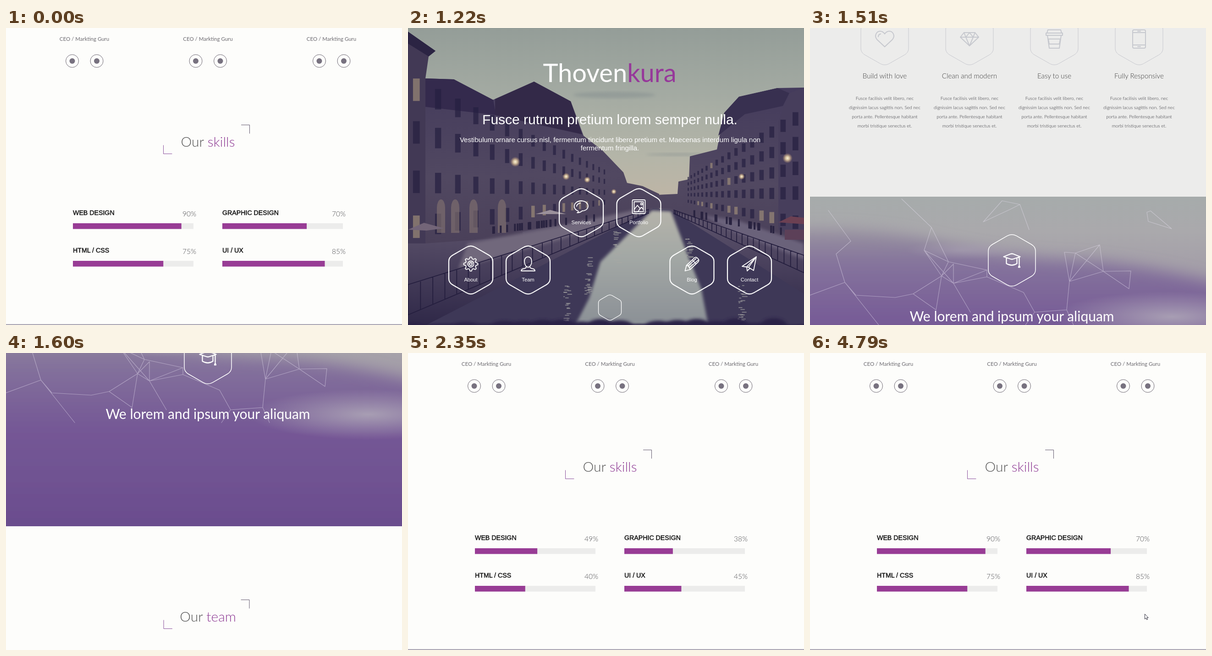
Animation of 864 by 648 pixels, one loop 4910 ms. Source, as an HTML page:

```html
<!DOCTYPE html>
<html lang="en">
<head>
<meta charset="utf-8">
<title>Template tour</title>
<style>
  html, body { margin: 0; width: 100%; height: 100%; overflow: hidden; background: #fdfdfb; }
  svg { display: block; width: 864px; height: 648px; }
  text { font-family: Lato, sans-serif; text-anchor: middle; }
  .arial { font-family: "Liberation Sans", Arial, sans-serif; }
  .line { fill: none; stroke-linejoin: round; stroke-linecap: round; }
</style>
</head>
<body>
<svg id="stage" viewBox="0 0 864 648"></svg>
<script>
const LOOP = 4910, FRAME = 1000 / 24;
const CUT = 1220, SCROLL_START = 1231, SCROLL_TIME = 638, SCROLL_END = 2433;
const FEATURES_Y = 988;

const skills = [
  { name: 'WEB DESIGN', value: 90, x: 146, y: 426, start: 1797 },
  { name: 'GRAPHIC DESIGN', value: 70, x: 472, y: 426, start: 1797 },
  { name: 'HTML / CSS', value: 75, x: 146, y: 508, start: 1809 },
  { name: 'UI / UX', value: 85, x: 472, y: 508, start: 1809 }
];

// Line icons, each centred on 0,0
const icons = {
  heart: 'M0 17L-17 1C-24 -8 -17 -17 -10 -17C-5 -17 -2 -14 0 -11C2 -14 5 -17 10 -17C17 -17 24 -8 17 1ZM-14 -5Q-14 -10 -9 -11',
  diamond: 'M-12 -14H12L20 -4L0 15L-20 -4ZM-20 -4H20M-12 -14L-8 -4L0 15L8 -4L12 -14M-8 -4L0 -14L8 -4',
  cup: 'M-14 -20H14L16 -13H-16ZM-18 -13H18V-8H-18ZM-15 -8L-11 20H11L15 -8M-13 0H13L11 11H-11Z',
  phone: 'M-11 -20H11Q14 -20 14 -17V17Q14 20 11 20H-11Q-14 20 -14 17V-17Q-14 -20 -11 -20ZM-14 -14H14M-14 13H14M-3 16.5H3M-3 -17H3',
  cap: 'M-18 -8L-3 -14Q0 -15 3 -14L18 -8L3 -3Q0 -2 -3 -3ZM-12 -5V7Q0 14 11 7V-5M16 -7V9M16 11L14.5 15H17.5Z',
  bubble: 'M-7 9C-20 5 -18 -12 0 -13C19 -12 20 8 2 9Q-2 13 -9 13Q-5 12 -7 9ZM-10 -1Q-9 -7 -2 -8',
  picture: 'M-12 -15H12Q14 -15 14 -13V13Q14 15 12 15H-12Q-14 15 -14 13V-13Q-14 -15 -12 -15ZM-10 -11H10V11H-10ZM-10 6L-3 -3L3 4L6 1L10 6M-2 11L3 4M4 -6a2 2 0 1 0 4 0a2 2 0 1 0 -4 0',
  person: 'M-8 -6C-8 -19 8 -19 8 -6C8 1 4 7 0 7C-4 7 -8 1 -8 -6ZM-4 6Q-4 9 -9 10Q-15 11 -15 15H15Q15 11 9 10Q4 9 4 6',
  pencil: 'M-15 15L-12 3L5 -13Q9 -17 13 -12Q17 -8 13 -4L-4 12ZM-12 3Q-6 3 -4 12M-8 4L9 -12M-6 8L13 -8M1 -9L9 0',
  plane: 'M-16 5L15 -16L9 14L-2 7ZM-16 5L-2 7L15 -16L-6 6L-5 15L1 9'
};
const gear = () => {
  let path = '';
  for (let i = 0; i < 32; i++) {
    const radius = i % 4 < 2 ? 15.5 : 11.5, angle = (i - .5) * Math.PI / 16;
    path += `${i ? 'L' : 'M'}${radius * Math.cos(angle)} ${radius * Math.sin(angle)}`;
  }
  return path + 'ZM-6.5 0a6.5 6.5 0 1 0 13 0a6.5 6.5 0 1 0 -13 0M-3 0a3 3 0 1 0 6 0a3 3 0 1 0 -6 0';
};
icons.gear = gear();

const text = (x, y, size, content, attrs = '') =>
  `<text x="${x}" y="${y}" font-size="${size}" ${attrs}>${content}</text>`;
const rect = (x, y, w, h, fill, attrs = '') =>
  `<rect x="${x}" y="${y}" width="${w}" height="${h}" fill="${fill}" ${attrs}/>`;
const ellipse = (x, y, rx, ry, fill, attrs = '') =>
  `<ellipse cx="${x}" cy="${y}" rx="${rx}" ry="${ry}" fill="${fill}" ${attrs}/>`;
const shape = (points, fill, attrs = '') => `<polygon points="${points}" fill="${fill}" ${attrs}/>`;
const line = (d, stroke, width, attrs = '') =>
  `<path class="line" d="${d}" stroke="${stroke}" stroke-width="${width}" ${attrs}/>`;
const group = (x, y, content) => `<g transform="translate(${x} ${y})">${content}</g>`;
const gradient = (id, ...stops) => `<linearGradient id="${id}" x2="0" y2="1">` +
  stops.map(([at, color, alpha = 1]) => `<stop offset="${at}" stop-color="${color}" stop-opacity="${alpha}"/>`).join('') +
  '</linearGradient>';
const blur = (id, amount) => `<filter id="${id}" x="-20%" y="-20%" width="140%" height="140%"><feGaussianBlur stdDeviation="${amount}"/></filter>`;

function hexagon(w, h, stroke, width, attrs) {
  const side = s => `Q${s * w} ${s * h * .52} ${s * w * .82} ${s * h * .614}L${s * w * .2} ${s * h * .936}` +
    `Q0 ${s * h * 1.04} ${-s * w * .2} ${s * h * .936}L${-s * w * .82} ${s * h * .614}Q${-s * w} ${s * h * .52} ${-s * w} ${s * h * .36}`;
  return line(`M${-w} ${-h * .36}${side(-1)}L${w} ${h * .36}${side(1)}Z`, stroke, width, attrs);
}

function heading(y, word, half) {
  const left = 440.5 - half - 38.5, right = 440.5 + half + 32.5;
  return group(0, y,
    text(440.5, 259, 30, `Our <tspan fill="#8e3a94">${word}</tspan>`, 'font-weight="300" fill="#555"') +
    line(`M${right - 18} 211.5H${right}V230`, '#62586e', 1) +
    line(`M${left} 256V274.5H${left + 18.5}`, '#8a4f9c', 1));
}

let seed = 7;
const random = () => (seed = seed * 16807 % 2147483647) / 2147483647;

// Windows on a facade that recedes to the vanishing point 545,365
function facade(reach, floors, w, h) {
  let out = '';
  for (let s = .98; s > .2; s *= .91)
    floors.forEach((offset, i) => {
      const lit = random() < (i === floors.length - 1 ? .35 : .03);
      out += rect(545 + reach * s, 365 + offset * s, w * s, h * s, lit ? '#9c8a78' : '#262040', 'opacity=".7"');
    });
  return out;
}

function railing(x0, y0, x1, y1, height) {
  let d = `M${x0} ${y0}L${x1} ${y1}M${x0} ${y0 + height}L${x1} ${y1 + 8}`;
  for (let s = 0; s < 1; s += .035) {
    const u = 1 - (1 - s) ** 1.5;
    d += `M${x0 + (x1 - x0) * u} ${y0 + (y1 - y0) * u}v${height + (8 - height) * u}`;
  }
  return line(d, '#241e3e', 1.8);
}

function canalPhoto() {
  let out = rect(0, 0, 864, 400, 'url(#sky)') + rect(0, 400, 864, 248, 'url(#quay)') +
    ellipse(450, 146, 90, 7, '#7d878a', 'opacity=".4" filter="url(#soft)"') +
    ellipse(590, 276, 70, 3, '#7d878a', 'opacity=".4" filter="url(#soft)"') +
    shape('185,157 275,117 355,160 383,235 425,268 470,315 478,338 512,345 548,362 548,395 185,455', 'url(#wall)') +
    shape('38,110 100,112 186,157 250,230 250,455 38,470', 'url(#wall)') +
    shape('0,8 60,50 45,62 38,110 38,470 0,470', '#423955') +
    shape('0,8 60,50 45,62 0,34', '#2b2443') +
    shape('38,110 100,112 186,157 192,190 38,172', '#342a4d') +
    shape('190,155 275,117 355,160 380,232 190,190', '#332948') +
    shape('864,130 806,131 722,150 690,185 674,265 615,280 613,330 590,335 588,362 545,364 545,392 864,480', 'url(#wall)') +
    shape('864,130 832,142 808,205 808,440 864,460', '#473e5c') +
    shape('806,131 722,150 690,185 677,235 735,188 818,170 832,142', '#383050') +
    facade(-545, [-260, -165, -55, 45], 15, 50) +
    facade(300, [-185, -130, -75, -20, 45], 13, 30);
  for (const x of [72, 103, 143, 205])
    out += `<path d="M${x - 9} 447V392a9 18 0 0 1 18 0V447Z" fill="#857672" opacity=".6"/>`;
  out += shape('130,470 330,432 500,396 520,398 330,462 110,525', '#71687c', 'filter="url(#soft)"') +
    shape('640,408 720,420 864,470 864,505 700,440', '#6b627a', 'filter="url(#soft)"') +
    shape('535,393 572,396 864,580 864,648 40,648', '#3e3857') +
    shape('532,398 574,400 612,500 640,570 655,648 365,648 395,590 420,510', 'url(#water)', 'filter="url(#soft)"');
  // Lamp light broken up on the water
  for (let i = 0; i < 110; i++) {
    const column = i % 5, x = [455, 392, 347, 612, 727][column];
    const y = [440, 500, 560, 450, 560][column] + random() * 80;
    out += rect(x - 8 + random() * 10, y, 3 + random() * 9, 2, '#a9a8a6', 'opacity=".6"');
  }
  for (let i = 0; i < 44; i++) {
    const left = i % 2, x = left ? 160 + random() * 260 : 610 + random() * 240;
    const y = left ? 455 - x * .12 : 395 + (x - 610) * .2;
    out += rect(x, y, 4, 16, '#292340');
  }
  out += shape('0,440 35,425 78,437 40,442', '#736578') + shape('278,406 310,397 345,406', '#9b919b') +
    shape('808,424 835,411 864,414 864,428', '#6c4052') + rect(822, 440, 42, 22, '#5c4058') +
    railing(0, 560, 525, 396, 66) + railing(864, 496, 580, 397, 38);
  for (const [x, y, r] of [[234, 292, 11], [345, 324, 8], [391, 331, 7], [449, 357, 6], [728, 324, 7], [828, 284, 11]])
    out += `<circle cx="${x}" cy="${y}" r="${r}" fill="url(#glow)"/>`;
  for (let i = 0; i < 22; i++)
    out += ellipse(i * 42, 652, 30, 4 + random() * 15, '#292247', 'filter="url(#soft)"');
  return out;
}

function hero() {
  const links = [
    ['Services', 'bubble', 378, 403], ['Portfolio', 'picture', 503.5, 403], ['About', 'gear', 137, 528],
    ['Team', 'person', 262, 528], ['Blog', 'pencil', 619.5, 528], ['Contact', 'plane', 745, 528]
  ];
  return `<g clip-path="url(#screen)">${canalPhoto()}</g><g fill="#fff">` +
    text(440, 118, 56, 'Thoven<tspan fill="#96389a">kura</tspan>') +
    text(440.5, 210, 30, 'Fusce rutrum pretium lorem semper nulla.', 'class="arial"') +
    text(441, 249, 15, 'Vestibulum ornare cursus nisl, fermentum tincidunt libero pretium et. Maecenas interdum ligula non', 'class="arial"') +
    text(440.5, 267, 15, 'fermentum fringilla.', 'class="arial"') +
    links.map(([label, icon, x, y]) => group(x, y,
      hexagon(48, 53, '#fff', 2.2) + group(0, -13, line(icons[icon], '#fff', 1.8)) +
      text(0, 25, 11.2, label, 'class="arial"'))).join('') +
    group(440.5, 610, hexagon(25, 28, '#fff', 1.3)) + '</g>';
}

function features() {
  const items = [['Build with love', 'heart'], ['Clean and modern', 'diamond'], ['Easy to use', 'cup'], ['Fully Responsive', 'phone']];
  const copy = ['Fusce facilisis velit libero, nec', 'dignissim lacus sagittis non. Sed nec',
    'porta ante. Pellentesque habitant', 'morbi tristique senectus et.'];
  return rect(0, -340, 864, 708, '#ececeb') + heading(-428, 'services', 75) +
    items.map(([title, icon], i) => group(163 + i * 185, 0,
      group(0, 24, hexagon(52, 57, '#c3c4cb', 1, 'stroke-dasharray="2 1"') + line(icons[icon], '#c6c8ce', 2)) +
      text(0, 110, 15.2, title, 'font-weight="300" fill="#3c3c3c"') +
      copy.map((row, j) => text(0, 157 + j * 20, 10.1, row, 'font-weight="300" fill="#2c2c32"')).join(''))).join('');
}

function banner() {
  const web = 'M40 398L89 465L57 493L76 555L0 583M76 555L100 583L186 588L225 580L287 541M76 555L150 648' +
    'M200 373L265 435L249 485L302 510L386 528V543L313 557L287 541L302 510L265 435M249 485L287 541L313 515V557L386 528' +
    'M249 485L313 557L350 620M225 580L275 615L287 541';
  const kite = 'M378 423L419 377L458 385L478 440M378 423L436 396L458 385M735 402L743 399L789 438L738 422Z';
  const mesh = 'M555 489L579 491L632 473L640 531L700 530L696 569L640 531L566 553L555 489M579 491L566 553L560 615' +
    'L490 620L466 577L386 543M632 473L566 553M579 491L640 531M560 615L575 648M490 620L470 648';
  return rect(0, 368, 864, 506, 'url(#mist)') +
    '<path d="M-60 440Q130 430 270 465T560 505T920 565V930H-60Z" fill="url(#hill)" filter="url(#fog)"/>' +
    ellipse(790, 630, 260, 55, 'url(#haze)') + ellipse(330, 485, 120, 20, 'url(#haze)', 'opacity=".5"') +
    line(web + kite + mesh, '#e6dff0', 1.2, 'opacity=".45"') +
    group(440.5, 507, hexagon(51.5, 57, '#fff', 1.5) + line(icons.cap, '#fff', 2.3)) +
    text(440.5, 640, 30, 'We lorem and ipsum your aliquam', 'fill="#fff"');
}

function member(x, i) {
  const ring = dx => `<circle cx="${dx}" cy="72" r="14" fill="none" stroke="#6d6873"/><circle cx="${dx}" cy="72" r="6" fill="#77717f"/>`;
  return group(x, 0,
    group(0, -149, '<g clip-path="url(#avatar)"><circle r="78" fill="#e0e2e5"/>' +
      ellipse(0, -19, 31, 38, '#aab2b5') + '<circle cy="94" r="73" fill="#aab2b5"/></g>') +
    text(0, -7, 15, `Team member ${i + 1}`, 'font-weight="700" fill="#444"') +
    text(0, 28, 11.5, 'CEO / Markting Guru', 'fill="#6c6a70"') + ring(-26.5) + ring(27));
}

function team() {
  return rect(0, -571, 864, 1217, '#fdfdfb') + heading(-622, 'team', 58) +
    [171, 440.5, 710].map(member).join('') + heading(0, 'skills', 58.5) +
    skills.map(s =>
      text(s.x, s.y - 18.5, 14.2, s.name, 'class="arial" style="text-anchor:start" fill="#111" stroke="#111" stroke-width=".45"') +
      text(s.x + 254, s.y - 15, 15.5, '', 'class="count" font-weight="300" fill="#4c4c50"') +
      rect(s.x, s.y, 263, 12.5, '#ececeb') + rect(s.x, s.y, 0, 12.5, '#983c95', 'class="bar"')).join('') +
    rect(0, 646, 864, 2, '#a9a4b2');
}

const stage = document.getElementById('stage');
stage.innerHTML = '<defs>' +
  gradient('sky', [0, '#949d98'], [.35, '#a3aaa2'], [.7, '#b4b5a8'], [.9, '#bdb5a6']) +
  gradient('water', [0, '#b5b3aa'], [.4, '#a3a8a5'], [1, '#8b9096']) +
  gradient('quay', [0, '#5e556c'], [.35, '#4f4661'], [1, '#2f2848']) +
  gradient('wall', [0, '#443b5c'], [.6, '#514861'], [1, '#4a4059']) +
  gradient('mist', [0, '#a6abab'], [.15, '#aaa9ac'], [.4, '#a098a6'], [1, '#9a91a8']) +
  gradient('hill', [0, '#8d8499', .6], [.15, '#85749c'], [.45, '#755896'], [1, '#684a8c']) +
  '<radialGradient id="glow"><stop stop-color="#fff6dc"/><stop offset=".4" stop-color="#f0d8a8" stop-opacity=".8"/><stop offset="1" stop-color="#d9a878" stop-opacity="0"/></radialGradient>' +
  '<radialGradient id="haze"><stop stop-color="#b0a9b8" stop-opacity=".85"/><stop offset="1" stop-color="#b0a9b8" stop-opacity="0"/></radialGradient>' +
  blur('soft', 3) + blur('fog', 16) +
  '<clipPath id="avatar"><circle r="78"/></clipPath><clipPath id="screen"><path d="M0 0H864V648H0Z"/></clipPath></defs>' +
  `<g id="page">${group(0, FEATURES_Y, banner() + features())}${group(0, SCROLL_END, team())}${hero()}</g>` +
  '<path id="cursor" d="M.5 .5V11.5L3 9.2L4.8 13L6.6 12.2L4.9 8.5H8.2Z" fill="#fff" stroke="#333340"/>';

const page = document.getElementById('page'), cursor = document.getElementById('cursor');
const bars = stage.querySelectorAll('.bar'), counts = stage.querySelectorAll('.count');

const clamp = v => Math.min(1, Math.max(0, v));
const swing = v => .5 - Math.cos(Math.PI * v) / 2;

function render(time) {
  const moving = time >= CUT;
  const now = moving ? CUT + Math.floor((time - CUT + 5) / FRAME) * FRAME : time;

  const scroll = moving ? Math.round(SCROLL_END * swing(clamp((now - SCROLL_START) / SCROLL_TIME))) : SCROLL_END;
  page.setAttribute('transform', `translate(0 ${-scroll})`);

  skills.forEach((s, i) => {
    const progress = moving ? clamp((now - s.start) / 1000) : 1;
    bars[i].setAttribute('width', 263 * s.value / 100 * swing(progress));
    counts[i].textContent = progress ? Math.floor(s.value * progress) + '%' : s.value;
  });

  const rest = (1 - clamp((now - 4280) / 480)) ** 4;
  cursor.setAttribute('visibility', now >= 4280 ? 'visible' : 'hidden');
  cursor.setAttribute('transform', `translate(${Math.round(730 + 121 * rest)} ${Math.round(569 + 43 * rest)})`);
}

const begin = performance.now();
function tick() {
  render((performance.now() - begin) % LOOP);
  requestAnimationFrame(tick);
}
tick();
</script>
</body>
</html>
```
